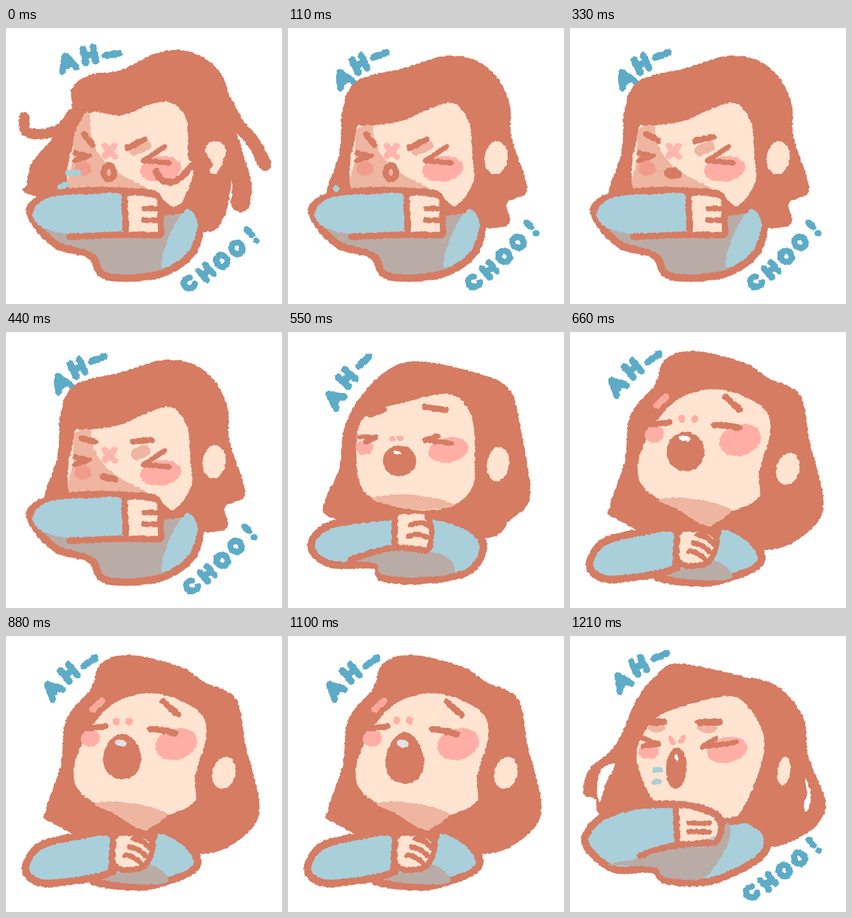
Recreate the animation shown at these times as an HTML page. Size 480 by 480 pixels, loop 1.32 s.

```html
<!DOCTYPE html>
<html lang="en">
<head>
<meta charset="utf-8">
<title>Ah-choo!</title>
<style>
  html, body { margin: 0; width: 100%; height: 100%; overflow: hidden; background: #fff; }
  svg { display: block; width: 100vw; height: 100vh; }
  .pose { animation: 1320ms step-end infinite; }
  @keyframes on1 { 0% { visibility: visible } 8.3333%, 100% { visibility: hidden } }
  @keyframes on4 { 0% { visibility: visible } 33.3333%, 100% { visibility: hidden } }
  @keyframes on5 { 0% { visibility: visible } 41.6667%, 100% { visibility: hidden } }
</style>
</head>
<body>
<svg viewBox="0 0 480 480" role="img" aria-label="AH– CHOO!">
  <defs>
    <filter id="rough" filterUnits="userSpaceOnUse" x="0" y="0" width="480" height="480" color-interpolation-filters="sRGB">
      <feTurbulence type="fractalNoise" baseFrequency=".17" numOctaves="2" seed="4" result="noise"/>
      <feDisplacementMap in="SourceGraphic" in2="noise" scale="5" xChannelSelector="R" yChannelSelector="G"/>
      <feGaussianBlur stdDeviation=".6"/>
    </filter>
  </defs>
  <g id="art" filter="url(#rough)" stroke-linecap="round" stroke-linejoin="round"></g>
</svg>
<script>
const HAIR = '#d57c63', SKIN = '#ffe4d1', SHADE = '#eeb5a0', BLUSH = '#ffaea6', WARM = '#f19c8b',
      SLEEVE = '#a9cfdb', GREY = '#b9aca7', INK = '#5dabc6', WHITE = '#fff', TOOTH = '#e2e2e2';
const STEP = 110, LOOP = 1320, OUTLINE = 13;

const lerp = (a, b, t) => a + (b - a) * t;
const repeat = (n, draw) => Array.from({ length: n }, (_, i) => draw(i)).join('');

// Catmull-Rom curve through "x,y x,y ..."
function curve(text, closed) {
  const p = text.trim().split(/\s+/).map(s => s.split(',').map(Number)), n = p.length;
  const at = i => closed ? p[(i + n) % n] : p[Math.max(0, Math.min(n - 1, i))];
  let d = 'M' + p[0];
  for (let i = 0; i < (closed ? n : n - 1); i++) {
    const [a, b, c, e] = [at(i - 1), at(i), at(i + 1), at(i + 2)];
    const out = b.map((v, j) => v + (c[j] - a[j]) / 6);
    const into = c.map((v, j) => v - (e[j] - b[j]) / 6);
    d += `C${out} ${into} ${c}`;
  }
  return d + (closed ? 'Z' : '');
}

const blob = (fill, pts, w = 0) =>
  `<path d="${curve(pts, true)}" fill="${fill}" stroke="${HAIR}" stroke-width="${w}"/>`;
const line = (color, w, pts) =>
  `<path d="${curve(pts)}" fill="none" stroke="${color}" stroke-width="${w}"/>`;
const oval = (fill, x, y, rx, ry, rot = 0, w = 0) =>
  `<ellipse rx="${rx}" ry="${ry}" fill="${fill}" stroke="${HAIR}" stroke-width="${w}" transform="translate(${x} ${y}) rotate(${rot})"/>`;
// Stroke from a point outwards, sagging by -bow
const ray = (color, w, x, y, len, rot, bow = 0) =>
  `<path d="M0,0Q${len / 2},${-bow} ${len},0" fill="none" stroke="${color}" stroke-width="${w}" transform="translate(${x} ${y}) rotate(${rot})"/>`;
// Straight stroke around its middle
const dash = (color, w, x, y, len, rot) =>
  `<path d="M${-len / 2},0H${len / 2}" stroke="${color}" stroke-width="${w}" transform="translate(${x} ${y}) rotate(${rot})"/>`;
const brow = (x, y, len, rot, w = 11) => dash(HAIR, w, x, y, len, rot);
const eye = (x, y, len1, rot1, len2, rot2) => ray(HAIR, 9, x, y, len1, rot1) + ray(HAIR, 9, x, y, len2, rot2);
const fingers = (n, x, y, dx, dy, len, rot, bow = 0) =>
  repeat(n, i => ray(HAIR, 9, x + i * dx, y + i * dy, len, rot, bow));

function egg(x, y, rx, ry, taper) {
  const pts = Array.from({ length: 12 }, (_, i) => {
    const a = i * Math.PI / 6, s = Math.sin(a);
    return [x + rx * Math.cos(a) * (1 + taper * s), y + ry * s];
  });
  return blob(HAIR, pts.join(' '));
}

const GLYPHS = {
  A: 'M-11,11L0,-11L11,11M-7,4H7',
  H: 'M-8,-11V11M8,-11V11M-8,0H8',
  '–': 'M-11,0H11',
  C: 'M7,-7C-2,-14 -10,-7 -9,0S0,13 7,7',
  O: 'M0,-10A9,10 0 1 0 .1,-10Z',
  '!': 'M0,-13V0M0,13V13.1'
};

// Letters spread along a shallow arc; each turns a little further than the last
function word(text, x0, y0, x1, y1, { rot, turn = 0, bow = 0, size = 1 }) {
  const n = text.length - 1, dist = Math.hypot(x1 - x0, y1 - y0);
  return repeat(n + 1, i => {
    const t = i / n, lift = bow * Math.sin(Math.PI * t) / dist;
    const x = lerp(x0, x1, t) + (y1 - y0) * lift, y = lerp(y0, y1, t) - (x1 - x0) * lift;
    return `<path d="${GLYPHS[text[i]]}" fill="none" stroke="${INK}" stroke-width="11" transform="translate(${x} ${y}) rotate(${rot + turn * i}) scale(${size})"/>`;
  });
}
const ah = (x0, y0, x1, y1, rot) => word('AH–', x0, y0, x1, y1, { rot, turn: 5, bow: 6, size: 1.1 });
const choo = (x0, y0, x1, y1) => word('CHOO!', x0, y0, x1, y1, { rot: -42, bow: -4 });

// Sleeves and hand over the mouth
const coverArm = () =>
  blob(GREY, '41,320 75,291 150,283 250,287 268,303 290,317 318,311 338,335 326,388 285,421 235,434 170,430 147,396 85,375', OUTLINE) +
  blob(SLEEVE, '47,320 75,295 145,289 206,293 207,357 112,358 60,345') +
  blob(SLEEVE, '301,328 320,316 333,345 313,393 272,416 280,372') +
  blob(SKIN, '211,297 235,293 262,299 266,325 265,354 211,355') +
  ray(HAIR, 11, 206, 291, 66, 88) + ray(HAIR, 11, 110, 363, 157, -1, 3) +
  ray(HAIR, 11, 268, 302, 56, 88) + ray(HAIR, 11, 268, 322, 38, -8) +
  fingers(2, 239, 314, 0, 20, 27, 0);

// Shut eyes, nose and shaded cheek; the shade starts from the given forehead points
const shutFace = forehead =>
  blob(SHADE, forehead + ' 150,195 168,228 195,252 255,290 119,287 117,225') +
  oval(BLUSH, 269, 245, 36, 22, -8) + oval(WARM, 134, 244, 15, 13) +
  eye(239, 231, 43, -34, 45, 4) + eye(144, 223, 24, 194, 25, 164) +
  dash('#ffb5ad', 11, 180, 214, 25, 45) + dash('#ffb5ad', 11, 180, 214, 25, -45);

const face = t =>
  dash(SHADE, 15 + 6 * t, 234, 210, 26 - 12 * t, -24) +
  brow(143, lerp(194, 188, t), 24, lerp(52, 16, t)) +
  brow(lerp(226, 237, t), lerp(201, 189, t), 32, lerp(-28, -5, t)) +
  oval('none', 179, 251 + 3 * t, 9 + 2 * t, 12 - 11 * t, 14 * t, 11);

function sneeze() {
  return blob(HAIR, '37,270 45,235 84,187 113,148 115,105 145,82 200,73 260,44 315,40 365,68 389,120 394,190 389,290 376,334 345,354 200,330 42,290') +
    line(HAIR, 18, '32,155 35,180 68,184 98,172 114,150') +
    line(HAIR, 23, '383,130 402,166 430,198 450,237') +
    line(HAIR, 34, '378,165 395,220 410,270 408,303') +
    blob(SKIN, '146,148 200,152 250,133 288,130 314,160 317,225 327,236 314,288 275,316 119,285 118,195') +
    blob(SKIN, '346,214 355,199 375,200 382,218 366,253 354,249 359,236') +
    shutFace('118,190 130,160 144,147') + face(0) +
    line(HAIR, 12, '261,250 273,266 297,265 327,236') +
    dash(SLEEVE, 10, 117, 252, 18, -3) + dash(SLEEVE, 10, 100, 274, 14, -23) + coverArm() +
    ah(107, 60, 185, 46, -16) + choo(319, 444, 427, 360);
}

function hide() {
  return blob(HAIR, '67,284 90,215 95,140 120,92 200,70 280,48 345,67 384,125 389,190 416,280 381,304 372,346 200,340 74,300') +
    blob(SKIN, '119,178 140,171 200,161 250,139 290,131 316,168 320,220 320,275 268,314 119,285') +
    oval(SKIN, 362, 226, 20, 29, 6) + shutFace('118,182 130,171 147,172') + coverArm() +
    ah(96, 88, 160, 47, -30) + choo(323, 442, 423, 347);
}

const hideFace = t => face(t) + (t ? '' : dash(SLEEVE, 10, 84, 280, 2, 60));

function breathe() {
  return blob(HAIR, '65,292 90,235 97,170 125,114 175,65 230,51 330,72 385,100 404,165 421,285 386,327 348,358 200,360 74,322') +
    blob(SKIN, '121,175 145,140 200,123 280,108 318,144 325,220 317,278 265,308 190,304 128,270') +
    blob(SHADE, '146,289 200,282 260,290 289,303 225,309 175,300') +
    oval(SKIN, 365, 230, 19, 30, 8) + oval(BLUSH, 279, 205, 35, 22, -10) + oval(BLUSH, 133, 201, 15, 13) +
    brow(155, 139, 25, -20) + brow(256, 133, 37, 8) +
    eye(152, 183, 27, 182, 19, 152) + eye(238, 188, 24, -18, 46, 7) +
    oval(BLUSH, 181, 186, 5, 5) + oval(BLUSH, 195, 185, 6, 5) +
    oval(HAIR, 194, 224, 29, 27) + oval(WHITE, 190, 210, 7, 3, 8) +
    blob(SLEEVE, '41,377 60,342 120,327 240,319 310,338 340,371 315,416 240,432 165,428 151,406 75,404', OUTLINE) +
    blob(GREY, '100,397 180,381 240,382 274,390 288,419 220,427 163,421 152,402') +
    blob(SKIN, '190,322 215,317 238,319 247,340 243,375 190,368') +
    line(HAIR, 11, '108,396 145,384 188,375 242,380') + ray(HAIR, 11, 186, 322, 50, 91) +
    line(HAIR, 10, '243,320 250,345 246,376') + fingers(2, 213, 336, -4, 20, 32, 2, 9) +
    ah(81, 116, 132, 51, -54);
}

function inhale() {
  return blob(HAIR, '70,300 95,225 105,145 148,91 165,48 215,33 300,52 345,80 400,110 417,190 441,300 410,351 345,379 200,375 80,325') +
    blob(SKIN, '119,225 150,156 195,113 260,100 330,127 349,168 329,245 326,290 264,318 240,337 190,310 130,272') +
    blob(SHADE, '154,292 195,288 245,296 280,311 245,336 222,331 195,312') +
    oval(SKIN, 379, 238, 20, 28, 14) + oval(BLUSH, 147, 178, 17, 14, -15) +
    dash('#fba89c', 12, 159, 120, 21, -43) + brow(158, 159, 33, -7, 10) +
    blob(SLEEVE, '150,425 190,400 245,370 265,337 318,365 328,405 240,436', OUTLINE) +
    blob(GREY, '168,423 195,412 250,397 282,427 220,431') +
    blob(SLEEVE, '35,397 60,365 120,349 185,345 186,408 80,430 42,420', OUTLINE) +
    blob(SKIN, '191,347 238,347 255,365 237,402 190,401', 10) +
    ray(HAIR, 11, 186, 347, 58, 92) + fingers(3, 221, 353, -7, 14, 32, 28, 7) +
    ah(81, 93, 145, 45, -45);
}

function inhaleFace(t) {
  return oval(BLUSH, 296, 188, 37, 27, -16) +
    brow(283 + 6 * t, 124 + 2 * t, 34, 42) + ray(HAIR, 11, 251, 162, 44, 6 + 6 * t, 3) +
    repeat(2, i => oval(BLUSH, 194 + 23 * i - 5 * t, 151 - 4 * t, 6, 7, 30 * i - 15)) +
    egg(201 + 2 * t, 208 + 4 * t, 33, 34 + 11 * t, .2 * t) +
    oval(t < .5 ? WHITE : TOOTH, 199, 185 + 2 * t, 10, 5 + 2 * t, 6);
}

function burst() {
  return blob(HAIR, '23,262 35,230 80,188 115,112 150,68 190,48 300,70 360,87 405,140 415,210 444,285 435,321 408,345 340,368 200,350 62,315 44,284 27,279') +
    blob(WHITE, '47,262 55,232 78,223 62,258 51,290') +
    blob(WHITE, '409,247 419,275 413,304 406,298 412,275') +
    blob(SKIN, '117,220 128,170 162,135 250,108 295,110 330,155 337,205 306,290 270,318 160,300') +
    oval(SKIN, 372, 235, 11, 25, 6) + oval(BLUSH, 273, 198, 36, 22, -10) + oval(BLUSH, 137, 201, 18, 13) +
    oval(SHADE, 151, 159, 15, 9) + oval(SHADE, 239, 159, 17, 10) +
    brow(151, 150, 24, 0, 12) + brow(242, 150, 36, 0, 12) +
    eye(154, 188, 29, 200, 27, 172) + eye(230, 193, 28, -32, 60, -8) +
    dash(BLUSH, 9, 177, 182, 9, 58) + dash(BLUSH, 9, 195, 180, 9, -50) +
    oval(HAIR, 185, 230, 18, 36, 3) + oval(WHITE, 185, 212, 3, 6, -15) +
    repeat(2, i => dash(SLEEVE, 10, 152 - i, 233 + 20 * i, 9 - 2 * i, 4 - 12 * i)) +
    blob(SLEEVE, '27,362 45,323 90,301 145,293 208,295 250,308 268,323 310,320 342,347 330,385 250,425 170,426 142,406 75,405', OUTLINE) +
    blob(GREY, '67,398 122,386 190,369 240,364 273,325 278,350 262,385 229,422 165,419 146,402') +
    blob(SKIN, '189,304 220,304 250,318 256,345 220,357 189,360') +
    line(HAIR, 11, '122,382 150,372 188,364 252,359') + ray(HAIR, 11, 184, 302, 58, 87) +
    line(HAIR, 11, '262,318 263,340 255,357') + fingers(2, 207, 325, 0, 15, 36, 1) +
    ah(90, 79, 157, 35, -33) + choo(316, 446, 424, 364);
}

const pose = (slot, span, art) =>
  `<g class="pose" style="animation-name:on${span};animation-delay:${slot * STEP - LOOP}ms">${art}</g>`;

document.getElementById('art').innerHTML =
  pose(0, 1, sneeze()) +
  pose(1, 4, hide()) + repeat(4, i => pose(1 + i, 1, hideFace(i / 3))) +
  pose(5, 1, breathe()) +
  pose(6, 5, inhale()) + repeat(5, i => pose(6 + i, 1, inhaleFace(i / 4))) +
  pose(11, 1, burst());
</script>
</body>
</html>
```
